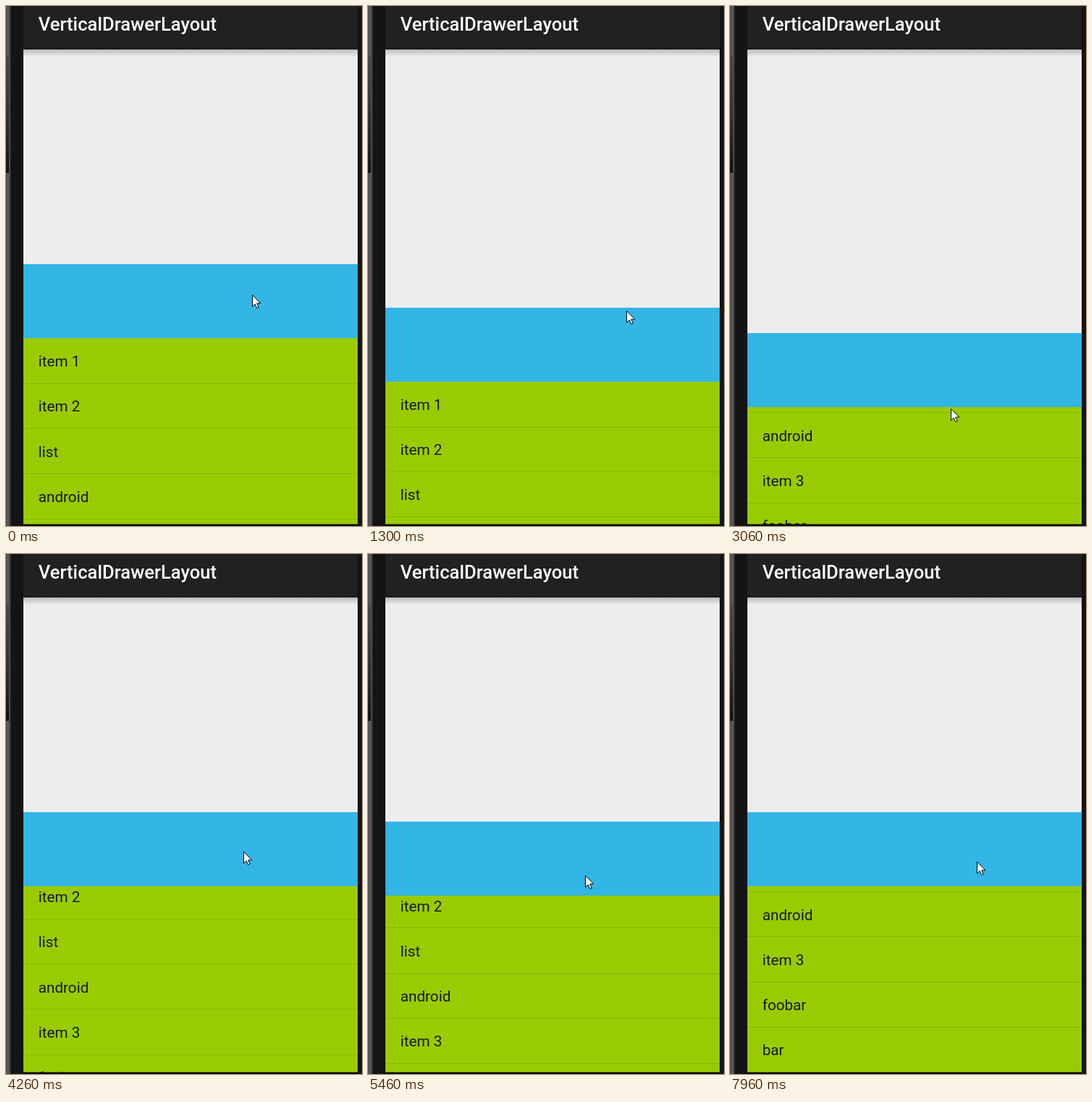
An HTML page with a canvas that plays this animation: 492x717 px, repeating every 8000 ms.

```html
<!DOCTYPE html>
<html lang="en">
<head>
<meta charset="utf-8">
<title>VerticalDrawerLayout</title>
<style>
html, body { margin: 0; width: 100%; height: 100%; overflow: hidden; background: #141414; }
canvas { display: block; width: 492px; height: 717px; }
</style>
</head>
<body>
<canvas id="stage" width="492" height="717"></canvas>
<script>
const ctx = document.getElementById('stage').getContext('2d');
const W = 492, H = 717, LOOP = 8000, STEP = 133, PHASE = 30;
const LEFT = 24, WIDTH = 462, BAR = 60, BOTTOM = 714.5;
const OPEN = 356, CLOSED = 612, HANDLE = 102, ROW = 62.3, MAX_SCROLL = 179.4;
const ITEMS = ['item 1', 'item 2', 'list', 'android', 'item 3', 'foobar', 'bar'];

// Pointer gestures: what it does, until when, and where it ends.
// The drawer and the list follow the pointer within their limits.
const GESTURES = [
  ['move', 120, 340, 398],
  ['drag', 700, 352, 660],
  ['move', 840, 354, 616],
  ['drag', 1440, 358, 360],
  ['move', 1570, 340, 600],
  ['scroll', 1900, 330, 415],
  ['move', 1960, 326, 460],
  ['drag', 2508, 310, 689],
  ['drag', 3029, 305, 555],
  ['drag', 3300, 309, 550],
  ['drag', 3560, 314, 455],
  ['move', 3640, 318, 485],
  ['scroll', 3990, 325, 585],
  ['move', 4226, 328, 410],
  ['move', 4400, 328, 410],
  ['drag', 5024, 263, 671],
  ['move', 5120, 264, 686],
  ['drag', 5440, 302, 429],
  ['move', 5590, 306, 486],
  ['scroll', 5860, 318, 566],
  ['move', 6140, 318, 566],
  ['move', 6487, 322, 589],
  ['move', 6720, 324, 604],
  ['scroll', 7140, 338, 424],
  ['move', 7230, 338, 424],
  ['drag', 7560, 345, 608],
  ['drag', 7950, 341, 424]
];

const clamp = (v, lo, hi) => Math.min(hi, Math.max(lo, v));

// Replays the gestures up to time t.
function stateAt(t) {
  let x = 340, y = 398, top = OPEN, scroll = 0, start = 0;
  for (const [kind, end, toX, toY] of GESTURES) {
    if (t <= start) break;
    const part = Math.min(1, (t - start) / (end - start));
    const dy = (toY - y) * part;
    x += (toX - x) * part;
    y += dy;
    if (kind === 'drag') top = clamp(top + dy, OPEN, CLOSED);
    if (kind === 'scroll') scroll = clamp(scroll - dy, 0, MAX_SCROLL);
    start = end;
  }
  return { x: Math.round(x), y: Math.round(y), top, scroll };
}

function rect(x, y, w, h, fill) {
  ctx.fillStyle = fill;
  ctx.fillRect(x, y, w, h);
}

function gradient(x0, y0, x1, y1, ...colors) {
  const g = ctx.createLinearGradient(x0, y0, x1, y1);
  colors.forEach((c, i) => g.addColorStop(i / (colors.length - 1), c));
  return g;
}

function text(str, x, y, font, fill) {
  ctx.font = font + ' Roboto, sans-serif';
  ctx.fillStyle = fill;
  ctx.fillText(str, x, y);
}

function drawPhone() {
  rect(0, 0, W, H, '#141414');
  rect(0, 0, 7, H, gradient(0, 0, 7, 0, '#4c4c4c', '#5a5a5a', '#505050', '#1c1c1c'));
  rect(0, 69, 4, 161, gradient(0, 69, 0, 230, '#484848', '#333', '#111'));
  rect(LEFT, 0, WIDTH, BAR, '#212121');
  rect(LEFT, 57, WIDTH, 3, '#1e1a1e');
  rect(LEFT, BAR, WIDTH, H - BAR, '#ededed');
  rect(LEFT, BAR, WIDTH, 10, gradient(0, BAR, 0, BAR + 10, '#bdbabd', '#ededed'));
  text('VerticalDrawerLayout', 44.7, 34, '500 25.6px', '#fff');
}

function drawDrawer(top, scroll) {
  const list = top + HANDLE;
  ctx.save();
  ctx.beginPath();
  ctx.rect(LEFT, Math.round(list), WIDTH, H);
  ctx.clip();
  rect(LEFT, list - 1, WIDTH, H, '#99cc00');
  ITEMS.forEach((item, i) => {
    const y = list + i * ROW - scroll;
    if (i) rect(LEFT, Math.round(y - 0.5), WIDTH, 1, '#87b400');
    text(item, 44.7, Math.round(y + 39), '400 20.7px', 'rgba(0,0,0,.87)');
  });
  ctx.restore();
  rect(LEFT, Math.round(top), WIDTH, HANDLE, '#33b5e5');
  rect(LEFT, BOTTOM, WIDTH, H - BOTTOM, '#080808');
}

function drawPointer(x, y) {
  const shape = new Path2D('M.5 .5V16.5L4.2 13L6.7 18.6L9.2 17.5L6.7 12H11.8Z');
  ctx.save();
  ctx.translate(x, y);
  ctx.fillStyle = '#fff';
  ctx.fill(shape);
  ctx.strokeStyle = '#000';
  ctx.lineWidth = 1;
  ctx.stroke(shape);
  ctx.restore();
}

function frame() {
  const now = performance.now() % LOOP;
  const tick = Math.floor((now + PHASE) / STEP) * STEP - PHASE;
  const { x, y, top, scroll } = stateAt(tick);
  drawPhone();
  drawDrawer(top, scroll);
  drawPointer(x, y);
  requestAnimationFrame(frame);
}
frame();
</script>
</body>
</html>
```
